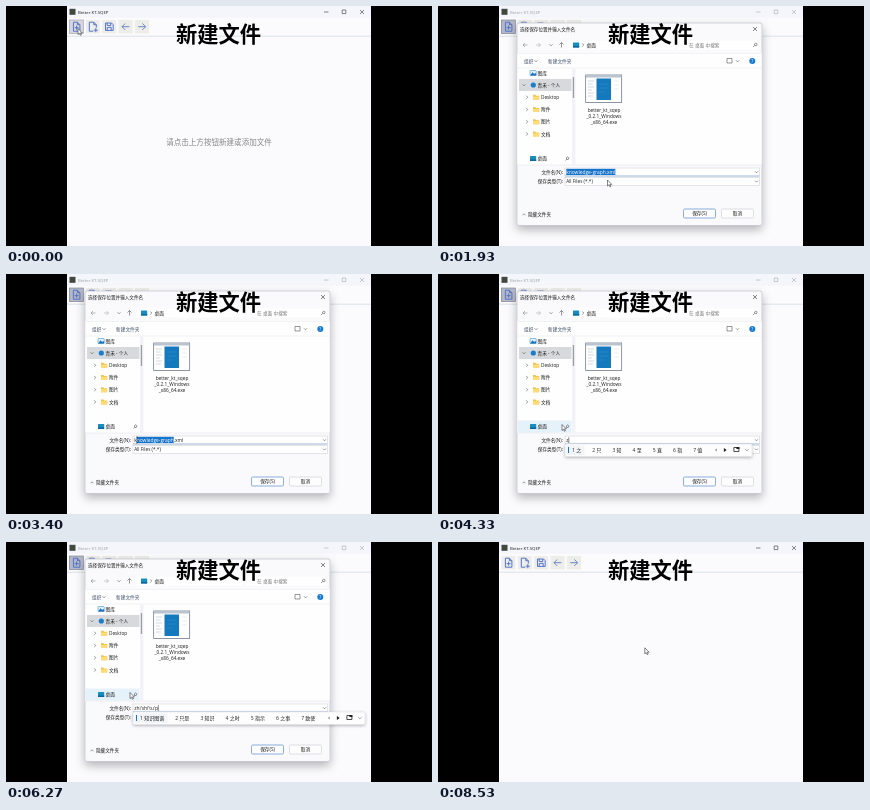
These frames come from a looping animation (426x240 px, 8.59 s). An HTML page:

```html
<!DOCTYPE html>
<html lang="zh-CN">
<head>
<meta charset="utf-8">
<style>
html, body { margin: 0; width: 100%; height: 100%; overflow: hidden; background: #000; }
svg { display: block; width: 100vw; height: 100vh; }
text { font-family: "Open Sans", "Noto Sans CJK SC", "Noto Sans CJK", sans-serif; white-space: pre; }
</style>
</head>
<body>
<svg id="stage" viewBox="0 0 426 240"></svg>
<script>
const LOOP = 8590, INK = '#1c1c1c';
const stage = document.getElementById('stage');

const text = (x, y, s, size = 4.7, fill = INK, extra = '') =>
  `<text x="${x}" y="${y + size * .36}" font-size="${size}" fill="${fill}" ${extra}>${s}</text>`;
const box = (x, y, w, h, fill, extra = '') =>
  `<rect x="${x}" y="${y}" width="${w}" height="${h}" fill="${fill}" ${extra}/>`;
const line = (d, color = '#555', w = .6) =>
  `<path d="${d}" fill="none" stroke="${color}" stroke-width="${w}"/>`;
const middle = 'text-anchor="middle"', end = 'text-anchor="end"';
const cross = (x, y) => line(`M${x - 2} ${y - 2}l4 4m0-4l-4 4`, '#333');
const right = (x, y) => line(`M${x - .8} ${y - 1.6}l1.6 1.6l-1.6 1.6`);
const down = (x, y) => line(`M${x - 1.5} ${y - .7}l1.5 1.5l1.5-1.5`);
const folder = (x, y) =>
  `<path d="M${x} ${y - 2.5}h2.4l.8 1h3v4h-6.2z" fill="#f5c445"/>` + box(x, y - .7, 6.2, 3.2, '#ffdc78');
const screen = (x, y) => box(x, y - 2.5, 6.2, 5, '#168fc0', 'rx=".6"') + box(x, y + 1, 6.2, 1.5, '#0b679f');
const picture = (x, y) => box(x, y - 2.5, 6.2, 5, '#e6f3fc', 'rx=".6" stroke="#3c8fcd" stroke-width=".6"') +
  `<path d="M${x} ${y + 2.5}l2.6-3.2l1.6 1.6l1-.8l1 1v1.4z" fill="#1874bd"/>`;

// Toolbar glyphs, each drawn around its own centre
const glyphs = [
  'M-3-4.5h4l2.5 2.5v6.5h-6.5zM1-4.5v2.5h2.5M.2-1v4M-1.8 1h4',
  'M3.5 1v-3l-2.5-2.5h-4.5v9h4M1-4.5v2.5h2.5M3 1.5v4M1 3.5h4',
  'M-3.7-3.7h6l1.7 1.7v5.7h-7.7zM-2-3.7v2.5h3.6v-2.5M-2 3.7v-3h4v3',
  'M3.8 0h-7.4M-.4-3.2l-3.2 3.2l3.2 3.2',
  'M-3.8 0h7.4M.4-3.2l3.2 3.2l-3.2 3.2'
];
const toolbar = glyphs.map((d, i) => {
  const x = 70.4 + i * 16.4;
  return box(x - 7, 14, 14, 13.5, '#edede9', i ? '' : 'id="firstTool"') +
    `<path transform="translate(${x} 20.7)" d="${d}" fill="none" stroke="${i > 2 ? '#6681c4' : '#4e70cc'}" stroke-width=".95"/>`;
}).join('');

const main = box(61, 0, 304, 240, '#fbfbfe') + box(61, 0, 304, 11.5, '#f5f6fb') +
  box(63.5, 2.8, 6, 6, '#43483f') +
  `<g id="titleBar">${text(72, 6, 'Better KT-SQEP', 4.3)}` +
  line('M318 6h4.5', '#333') + line('M336.2 4h3.6v3.6h-3.6z', '#333') + cross(356, 6) + '</g>' +
  toolbar + line('M61 30.2h304', '#cfd4dc', .7) +
  text(213, 136, '请点击上方按钮新建或添加文件', 7.55, '#858585', 'id="hint" ' + middle);

const sidebar = picture(92, 67) + text(99.5, 67, '图库') +
  box(81, 73, 52.5, 12, '#d8d9dc') + down(86, 79) +
  '<circle cx="95.3" cy="79" r="2.6" fill="#1480d0"/>' + text(99.5, 79, '青禾 - 个人') +
  ['Desktop', '附件', '图片', '文档'].map((s, i) => {
    const y = 91.3 + i * 12.2;
    return right(89, y) + folder(95, y) + text(103, y, s);
  }).join('') +
  box(79.5, 146.5, 54, 12, '#e6f2fa', 'id="hover"') +
  screen(92, 152.5) + text(99.5, 152.5, '桌面') +
  line('M127.5 154.5l1.4-1.4m-.8-1l1.8 1.8l1-2.2l-1-1z', '#666', .7) +
  box(134, 62.5, 3.5, 96, '#f3f2f8') + box(134.8, 71, 1.3, 21, '#9a9ca0', 'rx=".6"');

const file = box(147.7, 69, 36, 27.5, '#fff', 'stroke="#5f6c7c" stroke-width=".7"') +
  box(148, 69.2, 35.4, 2.3, '#b9c3d0') +
  line('M150 75h6m-6 3h5m-5 3h6m-6 3h4m-4 3h6m-6 3h5', '#a9afb8', .5) +
  line('M176 75h5m-5 4h5m-5 4h5', '#d3d6dc', .5) +
  box(158.5, 72.5, 14.5, 21.5, '#1479bd') + line('M161 78h9m-9 4h9m-9 4h6', '#3f9bd4', .4) +
  ['better_kt_sqep', '_0.2.1_Windows', '_x86_64.exe']
    .map((s, i) => text(166, 104 + i * 6.1, s, 4.75, INK, middle)).join('');

const field = y => box(127, y, 194.5, 8, '#fff', 'stroke="#c9ccd3" stroke-width=".5"') + down(318.5, y + 4);
const button = (x, s, edge) =>
  box(x, 203, 32, 9, '#fdfdfd', `rx="1.2" stroke="${edge}" stroke-width=".7"`) +
  text(x + 16, 207.7, s, 4.7, INK, middle);

const dialog = box(79, 17, 245, 202.5, '#fafafc', 'rx="2" stroke="#b4b5bc" stroke-width=".6" filter="url(#shadow)"') +
  text(82, 23, '选择保存位置并输入文件名', 4.6) + cross(317, 23) +
  line('M89.5 39h-4.5m2-2l-2 2l2 2', '#888') + line('M98 39h4.5m-2-2l2 2l-2 2', '#aaa') +
  down(113, 39) + line('M123.5 41.5v-5m-2 2l2-2l2 2') +
  box(131, 34.5, 106, 9, '#fff', 'rx="1"') + screen(135, 39) + right(145, 39) + text(148.5, 39, '桌面') +
  box(241, 34.5, 79, 9, '#fff', 'rx="1"') + text(251, 39, '在 桌面 中搜索', 4.7, '#777') +
  line('M315 41l1.8-1.8a1.2 1.2 0 1 1 .3 .3') +
  box(79.3, 47, 244.4, 112, '#fefefe') + line('M79.3 47.5h244.4M79.3 62h244.4', '#e4e6eb', .5) +
  text(86, 55, '组织', 4.7, '#3d5068') + down(98, 55) + text(110, 55, '新建文件夹', 4.7, '#3d5068') +
  line('M289 52.5h5v4.5h-5z') + down(299.5, 55) +
  '<circle cx="314.3" cy="55" r="3" fill="#147bd1"/>' + text(314.3, 55, '?', 4.5, '#fff', middle) +
  sidebar + file + line('M79.3 159h244.4', '#e0e2e8', .5) +
  text(125, 166, '文件名(N):', 4.7, INK, end) + text(125, 175.3, '保存类型(T):', 4.7, INK, end) +
  field(162) + line('M127 170h194.5', '#5f93c8', .5) + field(171.3) +
  text(128.2, 175.3, 'All Files (*.*)') +
  '<rect id="mark" y="162.8" height="6.2" fill="#1674cb"/>' +
  text(128.2, 166, '', 4.9, INK, 'id="name"') +
  '<path id="caret" stroke="#111" stroke-width=".5"/>' +
  line('M84.5 209.3l1.5-1.5l1.5 1.5') + text(90, 208.5, '隐藏文件夹', 4.6) +
  button(245.5, '保存(S)', '#5b8bd0') + button(283.5, '取消', '#d0d2d8');

stage.innerHTML = `<defs><filter id="shadow" x="-10%" y="-10%" width="120%" height="130%">
  <feDropShadow dx="0" dy="4" stdDeviation="5" flood-opacity=".28"/></filter>
  <filter id="softShadow" x="-5%" y="-50%" width="110%" height="220%">
  <feDropShadow dx="0" dy="1" stdDeviation="1.5" flood-opacity=".3"/></filter></defs>
  ${main}<g id="dialog">${dialog}</g><g id="ime"></g>
  ${text(212.5, 28.8, '新建文件', 21.3, '#000', 'font-weight="700" ' + middle)}
  <path id="arrow" d="M0 0v6l1.4-1.2l1 2l1-.5l-1-1.9h1.9z" fill="#fff" stroke="#222" stroke-width=".55"/>
  <path id="beam" d="M-1-3h2M0-3v6M-1 3h2" stroke="#333" stroke-width=".5"/>`;

const $ = id => document.getElementById(id);
const show = (id, on) => $(id).style.display = on ? '' : 'none';
const ramp = (t, a, b) => Math.max(0, Math.min(1, (t - a) / (b - a)));
const ease = u => u * u * (3 - 2 * u);

const FILE = 'knowledge-graph.xml', STEM = 15, PINYIN = "zhi'shi'tu'pu";
const OPEN = 670, TYPE = 4300, COMMIT = 6520, CLOSE = 7000;
// Pointer stops: time, x, y
const path = [[300, 72, 22.5], [900, 72, 22.5], [1750, 169.5, 174], [2150, 169.5, 174],
  [2450, 168, 166], [2650, 168, 166], [3400, 131, 166], [3520, 128, 166],
  [3700, 128, 166], [4200, 124, 150.5], [7700, 124, 150.5], [8530, 206.8, 105.8]];

function pointer(t) {
  const i = path.findIndex(p => p[0] > t);
  if (i < 1) return (i ? path[path.length - 1] : path[0]).slice(1);
  const [a, x, y] = path[i - 1], [b, x2, y2] = path[i], u = ease(ramp(t, a, b));
  return [x + (x2 - x) * u, y + (y2 - y) * u];
}

function setName(s, from, to) {
  const el = $('name');
  el.innerHTML = `${s.slice(0, from)}<tspan fill="#fff">${s.slice(from, to)}</tspan>${s.slice(to)}`;
  const width = n => n ? el.getSubStringLength(0, n) : 0;
  $('mark').setAttribute('x', 128.2 + width(from));
  $('mark').setAttribute('width', width(to) - width(from));
  $('caret').setAttribute('d', `M${128.5 + width(to)} 163.2v5.8`);
}

function candidates(n) {
  const list = (n < 5 ? '之 只 知 至 直 指 值' : n < 9 ? '只是 知识 之时 指示 之事 致使 之势'
    : '知识图谱 只是 知识 之时 指示 之事 致使').split(' ');
  let x = 134, items = '';
  list.forEach((s, i) => {
    items += text(x, 176, `${i + 1} ${s}`, 5, '#222');
    x += 15.2 + 5 * s.length;
  });
  $('ime').innerHTML = box(127, 170, x - 88.4, 12.5, '#fdfdfe', 'rx="1.5" stroke="#d0d2d8" stroke-width=".4" filter="url(#softShadow)"') +
    box(128.5, 171.5, 13 + 5 * list[0].length, 9.5, '#f3f4f8', 'rx="1"') +
    box(130, 173, 1, 6, '#1674cb') + items +
    `<path d="M${x + 3.4} 174.6v2.8l-2-1.4z" fill="#999"/><path d="M${x + 10.5} 174v4l2.8-2z" fill="#222"/>` +
    line(`M${x + 20.5} 173.5h5v4h-5z`, '#222', .8) + box(x + 23, 173, 3, 2, '#222') + down(x + 33.5, 176);
}

function draw(t) {
  const open = t >= OPEN && t < CLOSE, composing = t >= TYPE && t < COMMIT;
  show('dialog', open);
  show('ime', composing);
  show('hint', t < CLOSE);
  $('titleBar').setAttribute('opacity', open ? .4 : 1);
  const tool = $('firstTool');
  tool.setAttribute('fill', open ? '#b4b8c6' : t < OPEN ? '#d8d8dc' : '#edede9');
  tool.setAttribute('stroke', open ? '#747786' : t < OPEN ? '#9a9ca8' : 'none');
  tool.setAttribute('stroke-width', .6);

  const [x, y] = pointer(t);
  if (open) {
    if (t < 2500) setName(FILE, 0, FILE.length);
    else if (t < TYPE) setName(FILE, Math.round(STEM - (STEM - 1) * ease(ramp(t, 2650, 3380)) - ramp(t, 3420, 3520)), STEM);
    else if (composing) {
      const n = 1 + Math.floor(5 * ramp(t, TYPE, 5200)) + Math.floor(7 * ramp(t, 5350, 6380));
      setName(PINYIN.slice(0, n).replace(/'$/, ''), n, n);
      candidates(n);
    } else setName('知识图谱', 4, 4);
    show('caret', t >= TYPE);
    show('hover', x < 134 && y > 146 && y < 158);
  }
  const typing = open && x > 127 && y > 162 && y < 170;
  show('arrow', !typing);
  show('beam', typing);
  $(typing ? 'beam' : 'arrow').setAttribute('transform', `translate(${x} ${y})`);
}

const start = performance.now();
function tick() {
  draw((performance.now() - start) % LOOP);
  requestAnimationFrame(tick);
}
tick();
</script>
</body>
</html>
```
